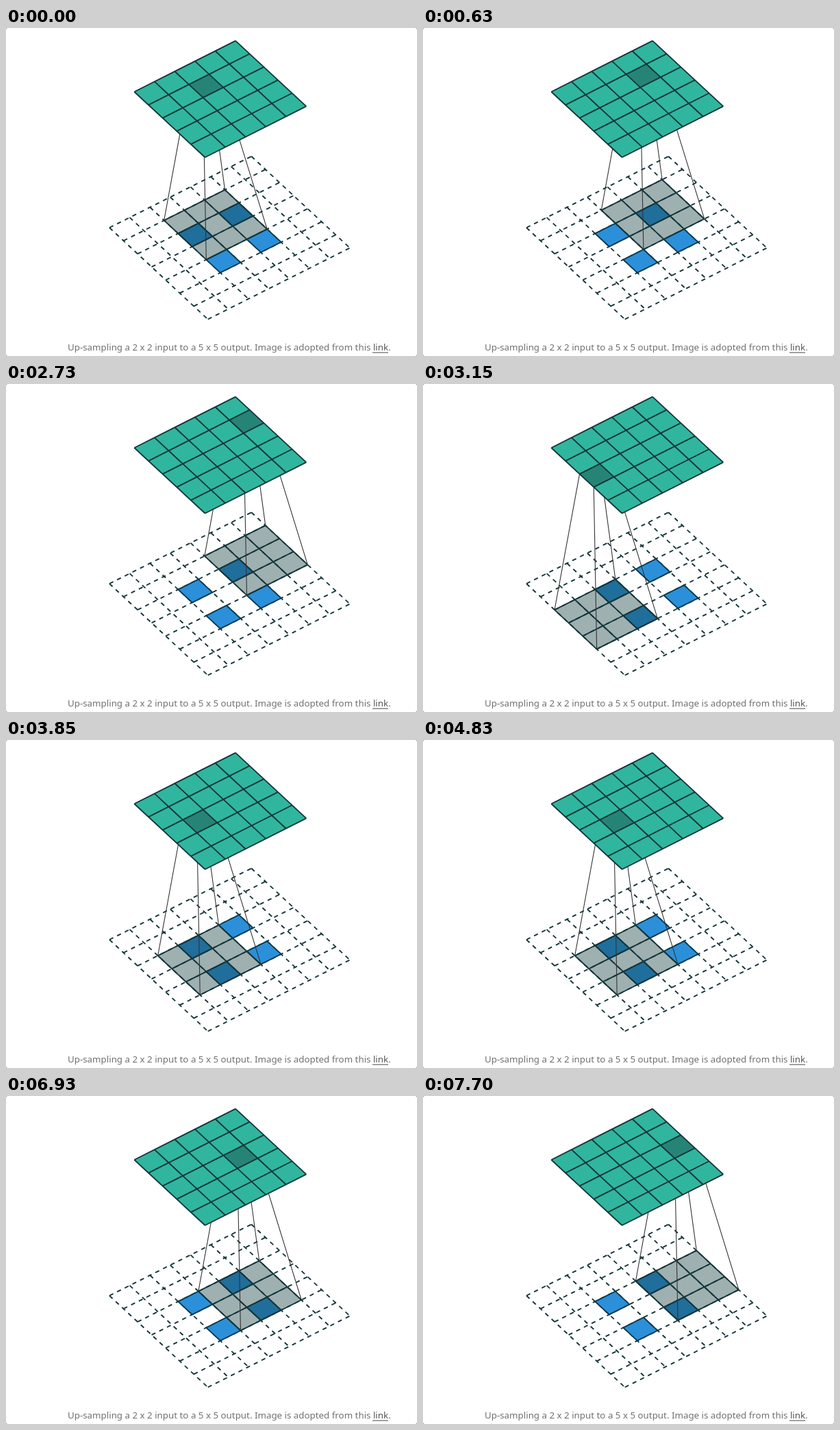
These frames come from a looping animation (600 by 478 pixels, 7910 ms). An HTML page:

```html
<!DOCTYPE html>
<html lang="en">
<head>
<meta charset="utf-8">
<title>Up-sampling</title>
<style>
  html, body { margin: 0; width: 100%; height: 100%; overflow: hidden; }
  html { background: #999; }
  body { background: #fff; border-radius: 3px; }
  svg { display: block; width: 100%; height: 100%; }
  .grid { fill: none; stroke: #14363a; stroke-width: 1.9; }
  .dashed { stroke-dasharray: 6.25; }
  .input { fill: #2b90d9; stroke: #0c3a4c; stroke-width: 1.9; }
  .kernel { fill: #103a3c; fill-opacity: .4; }
  .output { fill: #30b69e; }
  .cell { fill: #268477; }
  .ray { stroke: #333; stroke-width: 1.1; }
  text { font: 13.33px "Noto Sans", "Open Sans", sans-serif; fill: #707070; }
  .link { fill: #555; }
  .rule { stroke: #444; stroke-width: 1.1; }
</style>
</head>
<body>
<svg viewBox="0 0 600 478">
  <g id="scene"></g>
  <text x="90" y="470">Up-sampling a 2 x 2 input to a 5 x 5 output. Image is adopted from this <tspan class="link">link</tspan>.</text>
  <line class="rule" x1="535" x2="558" y1="473" y2="473"/>
</svg>
<script>
const LOOP = 7910;
// [start time, column, row] of the sliding 3 x 3 window
const STEPS = [
  [0, 2, 1], [630, 3, 1], [1680, 4, 1], [2800, 0, 2],
  [3850, 1, 2], [4900, 2, 2], [5950, 3, 2], [7000, 4, 2]
];

const plane = (x, y, ux, uy, vx, vy) => (u, v) => [x + u * ux + v * vx, y + u * uy + v * vy];
const lower = plane(151, 291, 29.6, -14.85, 20.53, 19.07);
const upper = plane(187.3, 93, 29.55, -14.88, 20.65, 19.1);

const corners = (at, u, v, n) => [at(u, v), at(u + n, v), at(u + n, v + n), at(u, v + n)];
const tile = (at, u, v, n, name) =>
  `<polygon class="${name}" points="${corners(at, u, v, n).join(' ')}"/>`;
const segment = (a, b) => `M${a}L${b}`;

function grid(at, u, v, n, name = '') {
  let d = '';
  for (let i = 0; i <= n; i++) {
    d += segment(at(u, v + i), at(u + n, v + i)) + segment(at(u + i, v), at(u + i, v + n));
  }
  return `<path class="grid ${name}" d="${d}"/>`;
}

function rays(u, v) {
  const ends = corners(upper, u, v, 1);
  const d = corners(lower, u, v, 3).map((p, i) => segment(p, ends[i])).join('');
  return `<path class="ray" d="${d}"/>`;
}

const floor = grid(lower, 0, 0, 7, 'dashed') +
  [[2, 2], [4, 2], [2, 4], [4, 4]].map(([u, v]) => tile(lower, u, v, 1, 'input')).join('');

const drawScene = (u, v) => floor +
  tile(lower, u, v, 3, 'kernel') + grid(lower, u, v, 3) + rays(u, v) +
  tile(upper, 0, 0, 5, 'output') + tile(upper, u, v, 1, 'cell') + grid(upper, 0, 0, 5);

const scene = document.getElementById('scene');
let shown;

function render() {
  const time = performance.now() % LOOP;
  const step = STEPS.findLast(([start]) => start <= time);
  if (step !== shown) {
    shown = step;
    scene.innerHTML = drawScene(step[1], step[2]);
  }
  requestAnimationFrame(render);
}
render();
</script>
</body>
</html>
```
